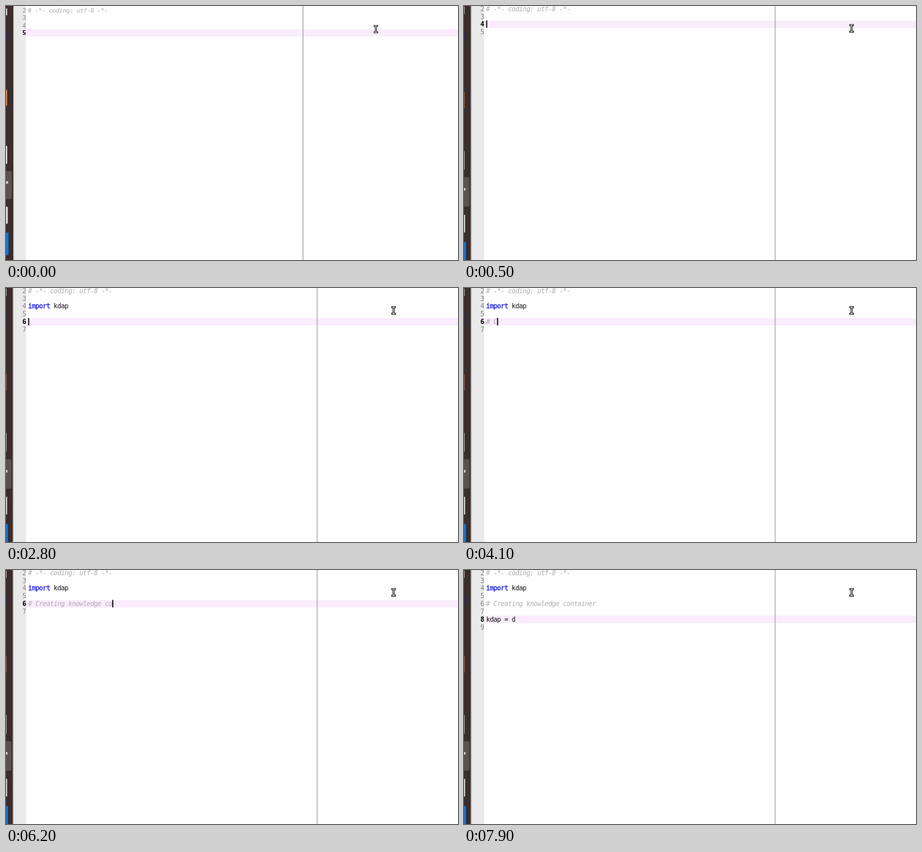
An HTML page for the animation above (8000 ms loop, 690 by 388 pixels).

```html
<!DOCTYPE html>
<html lang="en">
<head>
<meta charset="utf-8">
<title>Typing in a code editor</title>
<style>
  html, body { margin: 0; width: 100%; height: 100%; overflow: hidden; background: #fefefe; }
  svg { display: block; width: 690px; height: 388px; }
  text {
    font: 10px "DejaVu Sans Mono", "Liberation Mono", monospace;
    letter-spacing: -.44px;
    white-space: pre;
    fill: #111;
  }
  .comment { fill: #adadad; font-style: italic; }
  .keyword { fill: #2020e4; stroke: #2020e4; stroke-width: .35px; }
  .num { fill: #858585; }
  .num.current { fill: #000; font-weight: bold; }
</style>
</head>
<body>
<svg viewBox="0 0 690 388">
  <g id="view">
    <rect x="-10" y="-10" width="780" height="440" fill="#fefefe"/>
    <rect x="11" y="-10" width="19.8" height="440" fill="#eaeaea"/>
    <rect id="band" x="31" width="740" height="11.3" fill="#faebfd"/>
    <rect x="474.4" y="-10" width="1.1" height="440" fill="#9a9a9a"/>
    <g id="dock">
      <rect x="-10" y="-10" width="20.6" height="440" fill="#3b2d2d"/>
      <rect x="10.6" y="-10" width="1" height="440" fill="#b4afaf"/>
      <rect x="-10" y="261.5" width="18.3" height="45" rx="2" fill="#5c5050"/>
    </g>
    <g id="code"></g>
    <rect id="caret" width="1.6" height="11.4" fill="#000"/>
    <g id="pointer" transform="translate(591.7 34.2)" fill="none"></g>
  </g>
</svg>
<script>
const LOOP = 8000, TICK = 100;
const LEFT = 33.8, ADVANCE = 5.58, LEADING = 11.85;
const NS = 'http://www.w3.org/2000/svg';
const $ = id => document.getElementById(id);

function add(parent, tag, attrs = {}) {
  const el = document.createElementNS(NS, tag);
  for (const key in attrs) el.setAttribute(key, attrs[key]);
  return parent.appendChild(el);
}

const rowTop = row => 22 + (row - 4) * LEADING;
const baseline = row => rowTop(row) + 9.4;

// Dock icons: top, height, right edge, colour
[
  [1, 11, .7, '#d8d3d3'], [40, 13, 3, '#342840'], [131.5, 25, .6, '#e28558'],
  [221.5, 28.5, .6, '#f4f2f2'], [278, 4, 2.2, '#d5d0d0'], [319, 27, 1.7, '#d9d8d6'],
  [360.5, 36, 2.8, '#1478d4']
].forEach(([y, height, right, fill]) =>
  add($('dock'), 'rect', { x: -8, y, width: right + 8, height, fill }));

// I-beam: dark outline around a pale core
const beam = 'M-2-5H2M0-5V5M-2 5H2';
for (const [stroke, width] of [['#1c1c1c', 3], ['#e4e4e4', 1]]) {
  add($('pointer'), 'path', { d: beam, stroke, 'stroke-width': width, 'stroke-linecap': 'square' });
}

// Typed bursts per row: first key, last key, characters
const typing = {
  4: [[1400, 1900, 'import'], [2100, 2500, ' kdap']],
  6: [[3500, 3500, '#'], [3700, 3700, ' '], [4000, 4000, 'C'], [4300, 5100, 'reating '],
      [5200, 5900, 'knowledge '], [6100, 6800, 'container']],
  8: [[7200, 7900, 'kdap = d']]
};
const caretOff = [[0, 300], [800, 1100], [1900, 2100], [3100, 3300], [3700, 4000], [7900, 8000]];

function typed(row, t) {
  return (typing[row] || []).map(([from, to, str]) => {
    if (t < from) return '';
    if (t >= to) return str;
    return str.slice(0, 1 + Math.floor((t - from) / (to - from) * (str.length - 1) + 1e-6));
  }).join('');
}

const numbers = {}, lines = {};
for (let row = 2; row <= 9; row++) {
  numbers[row] = add($('code'), 'text', { x: 25.1, y: baseline(row) });
  numbers[row].textContent = row;
}
const header = add($('code'), 'text', { x: LEFT, y: baseline(2), class: 'comment' });
header.textContent = '# -*- coding: utf-8 -*-';
for (const row of [4, 6, 8]) {
  const line = add($('code'), 'text', { x: LEFT, y: baseline(row) });
  lines[row] = [add(line, 'tspan'), add(line, 'tspan')];
}

function paintLine(row, str) {
  const [head, tail] = lines[row];
  const isKeyword = str.startsWith('import');
  const cut = isKeyword ? 6 : str.length;
  head.textContent = str.slice(0, cut);
  tail.textContent = str.slice(cut);
  head.setAttribute('class', isKeyword ? 'keyword' : str[0] === '#' ? 'comment' : '');
}

function render(time) {
  const t = Math.floor(time % LOOP / TICK) * TICK;
  const zoom = Math.min(1, t / 500);
  const scale = (1 + .05 * zoom) / 1.05;
  const rest = 1 - zoom;
  $('view').setAttribute('transform',
    `translate(${1.2 / 1.05 * rest} ${3 / 1.05 * rest}) scale(${scale})`);

  const row = t < 300 ? 5 : t < 2800 ? 4 : t < 7100 ? 6 : 8;
  const last = t < 2800 ? 5 : row + 1;
  for (const n in numbers) {
    numbers[n].setAttribute('class', +n === row ? 'num current' : 'num');
    numbers[n].setAttribute('visibility', n <= last ? 'visible' : 'hidden');
  }
  for (const n in lines) paintLine(n, typed(n, t));

  $('band').setAttribute('y', rowTop(row) + .4);
  $('caret').setAttribute('x', LEFT + typed(row, t).length * ADVANCE);
  $('caret').setAttribute('y', rowTop(row));
  const hidden = caretOff.some(([from, to]) => t >= from && t < to);
  $('caret').setAttribute('visibility', hidden ? 'hidden' : 'visible');
}

const start = performance.now();
function frame() {
  render(performance.now() - start);
  requestAnimationFrame(frame);
}
frame();
</script>
</body>
</html>
```
